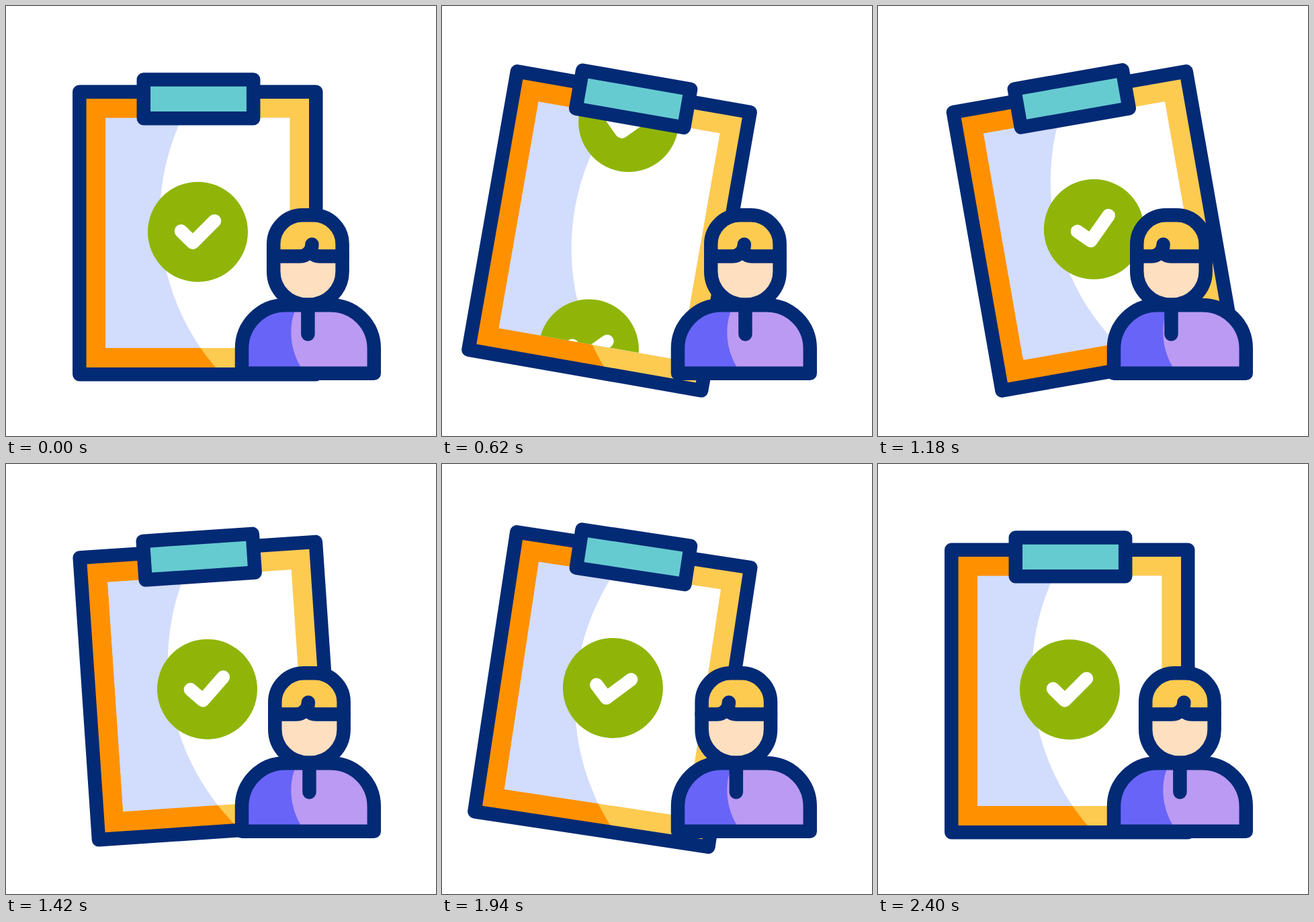
Write an HTML page that moves like this. It is 640 by 640 pixels and loops after 2420 ms.

```html
<!DOCTYPE html>
<html lang="en">
<head>
<meta charset="utf-8">
<title>Approved clipboard</title>
<style>
  html, body { margin: 0; width: 100%; height: 100%; overflow: hidden; background: #fff; }
  svg { display: block; width: 100vw; height: 100vh; }
  .line { stroke: #032a75; stroke-width: 20.5; stroke-linecap: round; stroke-linejoin: round; }
</style>
</head>
<body>
<svg viewBox="0 0 640 640" fill="none">
  <defs>
    <clipPath id="cover"><path d="M109.3 127.7H461.3V548.3H109.3Z"/></clipPath>
    <clipPath id="paper"><path d="M148 166.5H422.3V509H148Z"/></clipPath>
    <g id="badge">
      <circle cx="285.5" cy="336.2" r="74.5" fill="#90b508"/>
      <path d="M260.6 335L278 352.3L310.4 319.8" stroke="#fff" stroke-width="19.8" stroke-linecap="round" stroke-linejoin="round"/>
    </g>
  </defs>

  <g id="board">
    <g clip-path="url(#cover)">
      <path fill="#ff9100" d="M109 127H462V549H109Z"/>
      <circle cx="574" cy="313.7" r="345" fill="#fecb51"/>
    </g>
    <g clip-path="url(#paper)">
      <path fill="#d2dcfd" d="M148 166H423V510H148Z"/>
      <circle cx="574" cy="313.7" r="345" fill="#fff"/>
      <g id="badges">
        <use href="#badge"/>
        <use href="#badge" y="-343.5"/>
      </g>
    </g>
    <path class="line" d="M109.3 127.7H461.3V548.3H109.3Z"/>
    <path class="line" fill="#66cbd0" d="M204.8 109.4H368.2V167.2H204.8Z"/>
  </g>

  <g id="head">
    <path fill="#fedfbf" d="M-51.2 372V395A51 49.5 0 0 0 51.2 395V372Z"/>
    <path fill="#fecb51" d="M-51.2 372.5V354.3A43 43 0 0 1 -8.2 311.3H8.2A43 43 0 0 1 51.2 354.3V372.5Z"/>
    <path class="line" d="M-51.2 354.3A43 43 0 0 1 -8.2 311.3H8.2A43 43 0 0 1 51.2 354.3V395A49.5 49.5 0 0 1 1.7 444.5H-1.7A49.5 49.5 0 0 1 -51.2 395Z"/>
    <path class="line" id="fringe"/>
  </g>

  <path fill="#bb9af3" d="M351 546.8V510A64.5 64.5 0 0 1 415.5 445.2H483.3A64.5 64.5 0 0 1 547.8 510V546.8Z"/>
  <path fill="#6864f8" d="M351 546.8V510A64.5 64.5 0 0 1 415.5 445.2H433L429.5 455C422 475 421 508 438.5 537L445 546.8Z"/>
  <path class="line" d="M351 546.8V510A64.5 64.5 0 0 1 415.5 445.2H483.3A64.5 64.5 0 0 1 547.8 510V546.8Z"/>
  <path class="line" id="collar" d="M0 446V488.6"/>
</svg>
<script>
  const LOOP = 2420;
  const $ = id => document.getElementById(id);
  const place = (id, transform) => $(id).setAttribute('transform', transform);

  // Eases through evenly spaced values and holds the last one.
  function ease(values, step, t) {
    const last = values.length - 1;
    const i = Math.min(Math.floor(t / step), last - 1);
    const u = Math.min(t / step - i, 1);
    return values[i] + (values[i + 1] - values[i]) * u * u * (3 - 2 * u);
  }

  function draw(t) {
    const angle = ease([0, 10, -10, 10, 0], 600, t);
    const scroll = ease([0, 343], 1200, t);
    const headX = 449.4 + ease([0, -13.1, 13.1, -13.1, 13.1, -13.1, 0], 400, t);
    const tuft = ease([6, -12, 6, -12, 6, -12, 6], 400, t);

    // The board swings from the middle of its top edge.
    place('board', `rotate(${angle} 285.3 127.7)`);
    place('badges', `translate(0 ${scroll})`);
    place('head', `translate(${headX} 0)`);
    place('collar', `translate(${headX} 0)`);
    $('fringe').setAttribute('d',
      `M-51.2 372.5H${tuft - 17.7}A17.7 17.7 0 0 0 ${tuft} 354.8` +
      `M51.2 372.5H${tuft + 11.6}A17.7 17.7 0 0 1 ${tuft - 0.9} 367.3`);
  }

  function tick() {
    draw(performance.now() % LOOP);
    requestAnimationFrame(tick);
  }
  tick();
</script>
</body>
</html>
```
